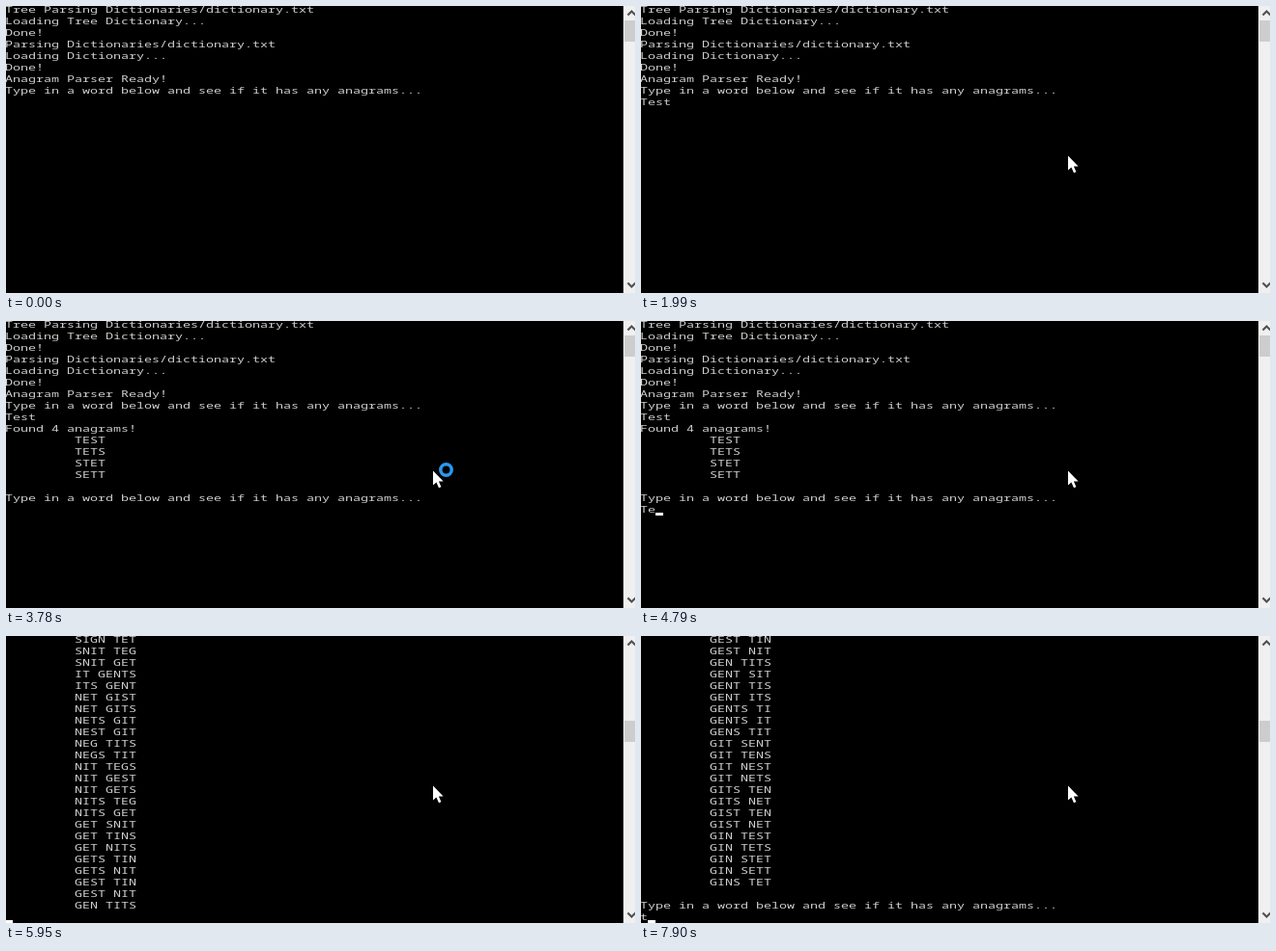
Write an HTML page that moves like this. It is 651x298 px and loops after 8000 ms.

```html
<!DOCTYPE html>
<html lang="en">
<head>
<meta charset="utf-8">
<title>Anagram console</title>
<style>
  html, body { margin: 0; width: 100%; height: 100%; overflow: hidden; background: #000; }
  #stage { position: relative; width: 651px; height: 298px; overflow: hidden; background: #000; }
  #text { position: absolute; left: -1px; top: -2px; }
  /* Low, wide console glyphs in 8 x 12 px cells. */
  #text div {
    width: max-content; height: 12px;
    font: 500 10px/12px "Noto Sans Mono", "DejaVu Sans Mono", monospace;
    font-variant-ligatures: none;
    color: #d0d0d0; white-space: pre;
    transform: scale(1.33333, 0.9); transform-origin: 0 0;
  }
  #caret { position: absolute; width: 8px; height: 3px; background: #fff; }
  #bar { position: absolute; left: 639px; top: 0; width: 12px; height: 298px; background: #f0f0f0; }
  #thumb { position: absolute; left: 1px; width: 11px; height: 22px; background: #cdcdcd; }
  svg { position: absolute; left: 0; top: 0; }
</style>
</head>
<body>
<div id="stage">
  <div id="text"></div>
  <div id="caret"></div>
  <div id="bar"><div id="thumb"></div></div>
  <svg width="651" height="298" viewBox="0 0 651 298">
    <g fill="none" stroke="#505050" stroke-width="2.1">
      <path d="M643.5 9.5 L647.5 5.5 L651.5 9.5"/>
      <path d="M643.5 287.5 L647.5 291.5 L651.5 287.5"/>
    </g>
    <circle id="ring" cx="455.5" cy="154.5" r="5.7" fill="none" stroke="#2c98f4" stroke-width="3.5"/>
    <path id="pointer" fill="#fff" d="M0 0 V15 L3.4 12 L6 17.6 L8.4 16.6 L5.9 11 H10.6 Z"/>
  </svg>
</div>
<script>
const LOOP = 8000;
const $ = id => document.getElementById(id);
const [text, caret, thumb, ring, pointer] = ["text", "caret", "thumb", "ring", "pointer"].map($);

const indent = word => " ".repeat(9) + word;
const prompt = "Type in a word below and see if it has any anagrams...";
const intro = [
  "Tree Parsing Dictionaries/dictionary.txt",
  "Loading Tree Dictionary...",
  "Done!",
  "Parsing Dictionaries/dictionary.txt",
  "Loading Dictionary...",
  "Done!",
  "Anagram Parser Ready!",
  prompt
];
const firstResult = [
  ...intro, "Test", "Found 4 anagrams!",
  ...["TEST", "TETS", "STET", "SETT"].map(indent),
  "", prompt
];
const pairs = (
  "SIGN TET,SNIT TEG,SNIT GET,IT GENTS,ITS GENT,NET GIST,NET GITS,NETS GIT,NEST GIT," +
  "NEG TITS,NEGS TIT,NIT TEGS,NIT GEST,NIT GETS,NITS TEG,NITS GET,GET SNIT,GET TINS," +
  "GET NITS,GETS TIN,GETS NIT,GEST TIN,GEST NIT,GEN TITS,GENT SIT,GENT TIS,GENT ITS," +
  "GENTS TI,GENTS IT,GENS TIT,GIT SENT,GIT TENS,GIT NEST,GIT NETS,GITS TEN,GITS NET," +
  "GIST TEN,GIST NET,GIN TEST,GIN TETS,GIN STET,GIN SETT,GINS TET"
).split(",").map(indent);

// Each table holds [start time, value]; a value lasts until the next entry.
const screens = [
  [0, { lines: intro, thumb: 15 }],
  [2540, { lines: firstResult, thumb: 15 }],
  [5950, { lines: pairs.slice(0, 24), thumb: 88 }],
  [6030, { lines: [...pairs.slice(21), "", prompt], thumb: 88 }]
];
const typed = [
  [0, ""], [1380, "T"], [1530, "Te"], [1760, "Tes"], [1910, "Test"],
  [2540, ""], [4560, "T"], [4790, "Te"], [5020, "Tes"], [5170, "Test"],
  [5490, "Testi"], [5640, "Testin"], [5720, "Testing"],
  [5950, ""], [7900, "t"]
];
const caretOn = [
  [0, false], [900, true], [1455, false], [1530, true], [1990, false],
  [2540, true], [3550, false], [4100, true], [4650, false], [4790, true],
  [6730, false], [7280, true], [7830, false], [7900, true]
];
const pointerAt = [
  [0, null], [70, [464, 211.6]], [145, [456, 190.6]], [215, [446, 166.6]], [290, [442, 155.6]]
];
const busyTimes = [1760, 2780, 3780, 6730];

const at = (table, t) => table.reduce((value, [start, next]) => t >= start ? next : value, null);
const show = (el, on) => { el.style.visibility = on ? "visible" : "hidden"; };

const rows = Array.from({ length: 25 }, () => text.appendChild(document.createElement("div")));

function draw(t) {
  const screen = at(screens, t);
  const input = at(typed, t);
  const lines = [...screen.lines, input];
  rows.forEach((row, i) => {
    const line = lines[i] || "";
    if (row.textContent !== line) row.textContent = line;
  });

  caret.style.left = input.length * 8 - 1 + "px";
  caret.style.top = screen.lines.length * 12 + 7 + "px";
  show(caret, at(caretOn, t));
  thumb.style.top = screen.thumb + "px";

  const spot = at(pointerAt, t);
  show(pointer, spot);
  if (spot) pointer.setAttribute("transform", `translate(${spot})`);
  show(ring, busyTimes.some(start => t >= start && t < start + 80));
}

const begin = performance.now();
function tick() {
  draw((performance.now() - begin) % LOOP);
  requestAnimationFrame(tick);
}
tick();
</script>
</body>
</html>
```
